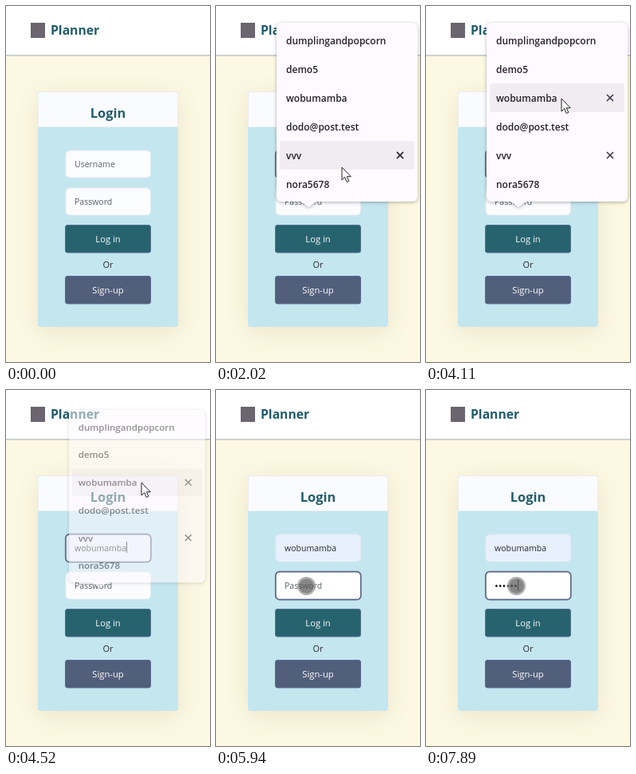
An HTML page that plays this animation: 256 px wide and 446 px high, repeating every 8 s.

```html
<!DOCTYPE html>
<html lang="en">
<head>
<meta charset="utf-8">
<title>Planner login</title>
<style>
  html, body { margin: 0; height: 100%; overflow: hidden; background: #fcf8e1; }
  svg { display: block; width: 100vw; height: 100vh; }
  text { font: 10.5px "Open Sans", "Noto Sans", sans-serif; fill: #25292e; }
  .title { font-weight: 700; fill: #205c6b; }
  .hint { fill: #56626a; }
  .mid { text-anchor: middle; }
  .btn { font-size: 11.2px; font-weight: 500; fill: #fff; }
  .item { font-size: 12px; font-weight: 600; fill: #24222a; }
  .card { filter: drop-shadow(0 6px 14px rgba(120, 90, 60, .12)); }
  .panel { fill: #fefaff; filter: drop-shadow(0 1px 2px rgba(0, 0, 0, .3)); }
  .popup { transform-box: fill-box; transform-origin: center; }
  .ring { fill: none; stroke: #5c6485; stroke-width: 1.7; }
  .cross { stroke: #33323c; stroke-width: 1.5; }
</style>
</head>
<body>
<svg viewBox="0 0 256 446">
  <rect width="256" height="446" fill="#fcf8e1"/>
  <rect class="card" x="40" y="107" width="176" height="295" rx="3" fill="#c4e6ef"/>
  <path d="M40.5 151.5V110a2.5 2.5 0 0 1 2.5-2.5H213a2.5 2.5 0 0 1 2.5 2.5V151.5Z" fill="#fafbfe" stroke="#e8eef0"/>
  <rect width="256" height="62" fill="#fff"/>
  <rect y="61" width="256" height="2" fill="#cbd1d0"/>
  <rect x="31" y="21" width="18" height="19" fill="#6b6570"/>
  <text class="title" x="56" y="36" style="font-size:15.7px">Planner</text>
  <text class="title mid" x="128" y="140" style="font-size:16.4px">Login</text>

  <rect id="userBox" x="75" y="181" width="106.500" height="34" rx="5" stroke="#e4eaf2"/>
  <rect id="userRing" class="ring" x="74.800" y="180.700" width="107" height="35" rx="5"/>
  <text id="user" x="86" y="202"></text>
  <rect id="passBox" x="75" y="228" width="106.500" height="34" rx="5" fill="#fbfcfe" stroke="#e4eaf2"/>
  <rect id="passRing" class="ring" x="74.800" y="227.700" width="107" height="35" rx="5"/>
  <text id="passHint" class="hint" x="86" y="249">Password</text>
  <text id="dots" x="86" y="249.700" style="font-size:12.8px"></text>
  <rect id="caret" width="1" height="14" fill="#222"/>

  <rect x="74.500" y="274.500" width="107" height="34.500" rx="2.500" fill="#27636f" stroke="#56718a"/>
  <text class="btn mid" x="128" y="296">Log in</text>
  <text class="mid" x="128" y="328" style="font-size:11px">Or</text>
  <rect x="74.500" y="338.500" width="107" height="34.500" rx="2.500" fill="#525f7b" stroke="#5c6590"/>
  <text class="btn mid" x="128" y="360">Sign-up</text>

  <g id="touch" opacity=".7">
    <circle r="10.500" fill="none" stroke="#8f8f8f" stroke-width="2"/>
    <circle r="9.600" fill="#555"/>
  </g>

  <g id="users" class="popup">
    <path class="panel" d="M82 21H247a6 6 0 0 1 6 6V239a6 6 0 0 1-6 6H126L116 252 106 245H82a6 6 0 0 1-6-6V27a6 6 0 0 1 6-6Z"/>
    <rect id="hover" x="80" width="169" height="36" rx="4" fill="#f1ecf2"/>
    <path id="hoverCross" class="cross"/>
    <path id="stuckCross" class="cross"/>
  </g>
  <g id="secrets" class="popup">
    <path class="panel" d="M103 380H108L118 372 128 380H247a6 6 0 0 1 6 6V418a6 6 0 0 1-6 6H103a6 6 0 0 1-6-6V386a6 6 0 0 1 6-6Z"/>
    <text class="item" x="109" y="407">dodo5678</text>
  </g>
  <path id="arrow" d="M0 0V16L3.700 12.600 6.200 18.500 8.800 17.400 6.400 11.700H11.300Z" fill="#fff" stroke="#222"/>
</svg>
<script>
const LOOP = 8000, ROW = 36, TOP = 25;
const names = ["dumplingandpopcorn", "demo5", "wobumamba", "dodo@post.test", "vvv", "nora5678"];
const keyTimes = [6670, 6770, 6970, 7170, 7380, 7680];
const $ = id => document.getElementById(id);
let t = 0;

// Progress from 0 to 1 in n held steps, the first at a and the last at b
const ramp = (a, b, n) =>
  t < a ? 0 : t >= b ? 1 : (Math.floor((t - a) / (b - a) * (n - 1) + .05) + 1) / n;
const within = (a, b) => t >= a && t < b;
const set = (id, attrs) => {
  for (const k in attrs) $(id).setAttribute(k, attrs[k]);
};
const show = (id, on) => set(id, { visibility: on ? "visible" : "hidden" });
const cross = y => `M227 ${y - 4}l8 8m0-8l-8 8`;

// Each move: [begin, end, steps, x, y]
function follow(start, moves) {
  let [x, y] = start;
  for (const [a, b, n, toX, toY] of moves) {
    const p = ramp(a, b, n), e = p * p * (3 - 2 * p);
    x += (toX - x) * e;
    y += (toY - y) * e;
  }
  return [x, y];
}

function place(id, [x, y], on) {
  set(id, { transform: `translate(${x} ${y})` });
  show(id, on);
}

function popup(id, opacity) {
  $(id).style.opacity = opacity;
  $(id).style.transform = `scale(${.93 + .07 * opacity})`;
}

names.forEach((name, i) => {
  const el = document.createElementNS($("users").namespaceURI, "text");
  el.textContent = name;
  el.setAttribute("class", "item");
  el.setAttribute("x", 88);
  el.setAttribute("y", 47.5 + ROW * i);
  $("users").append(el);
});
set("stuckCross", { d: cross(187) });

function draw() {
  const touch = follow([231.5, 395.5], [
    [280, 280, 1, 226.5, 384.5], [580, 1290, 8, 158.5, 201.5],
    [4940, 4940, 1, 117, 230], [5050, 5050, 1, 115.5, 238.5], [5140, 5240, 2, 113.5, 245.5]
  ]);
  place("touch", touch, within(180, 2020) || t >= 4940);

  const arrow = follow([158, 202], [
    [2810, 3110, 4, 197, 88], [3210, 3310, 2, 193, 99],
    [3410, 3610, 3, 185, 108], [3710, 4020, 4, 170, 116]
  ]);
  place("arrow", arrow, within(2020, 4720));

  const row = Math.floor((arrow[1] - 28) / ROW);
  set("hover", { y: TOP + ROW * row });
  set("hoverCross", { d: cross(TOP + ROW * (row + .5)) });
  popup("users", ramp(1590, 2020, 5) - ramp(4420, 4720, 4));
  popup("secrets", ramp(6770, 6970, 3) - ramp(7680, 7890, 3));

  const filled = t >= 4420;
  $("user").textContent = filled ? names[2] : "Username";
  set("user", { class: filled ? "" : "hint" });
  set("userBox", { fill: filled ? "#e8f0fe" : "#fbfcfe" });
  const moved = ramp(5440, 5640, 3);
  set("userRing", { opacity: ramp(1490, 1790, 4) - moved });
  set("passRing", { opacity: moved });
  set("passBox", { fill: moved ? "#fff" : "#fbfcfe" });

  const typed = keyTimes.filter(k => t >= k).length;
  show("passHint", !typed);
  $("dots").textContent = "•".repeat(typed);

  const inPass = t >= 5440;
  set("caret", { x: inPass ? 86.4 + 4.8 * typed : 151, y: inPass ? 237.5 : 190 });
  show("caret", within(4420, 4940) || within(5440, 5940) || t >= 6470);
}

function tick(now) {
  t = now % LOOP;
  draw();
  requestAnimationFrame(tick);
}
draw();
requestAnimationFrame(tick);
</script>
</body>
</html>
```
